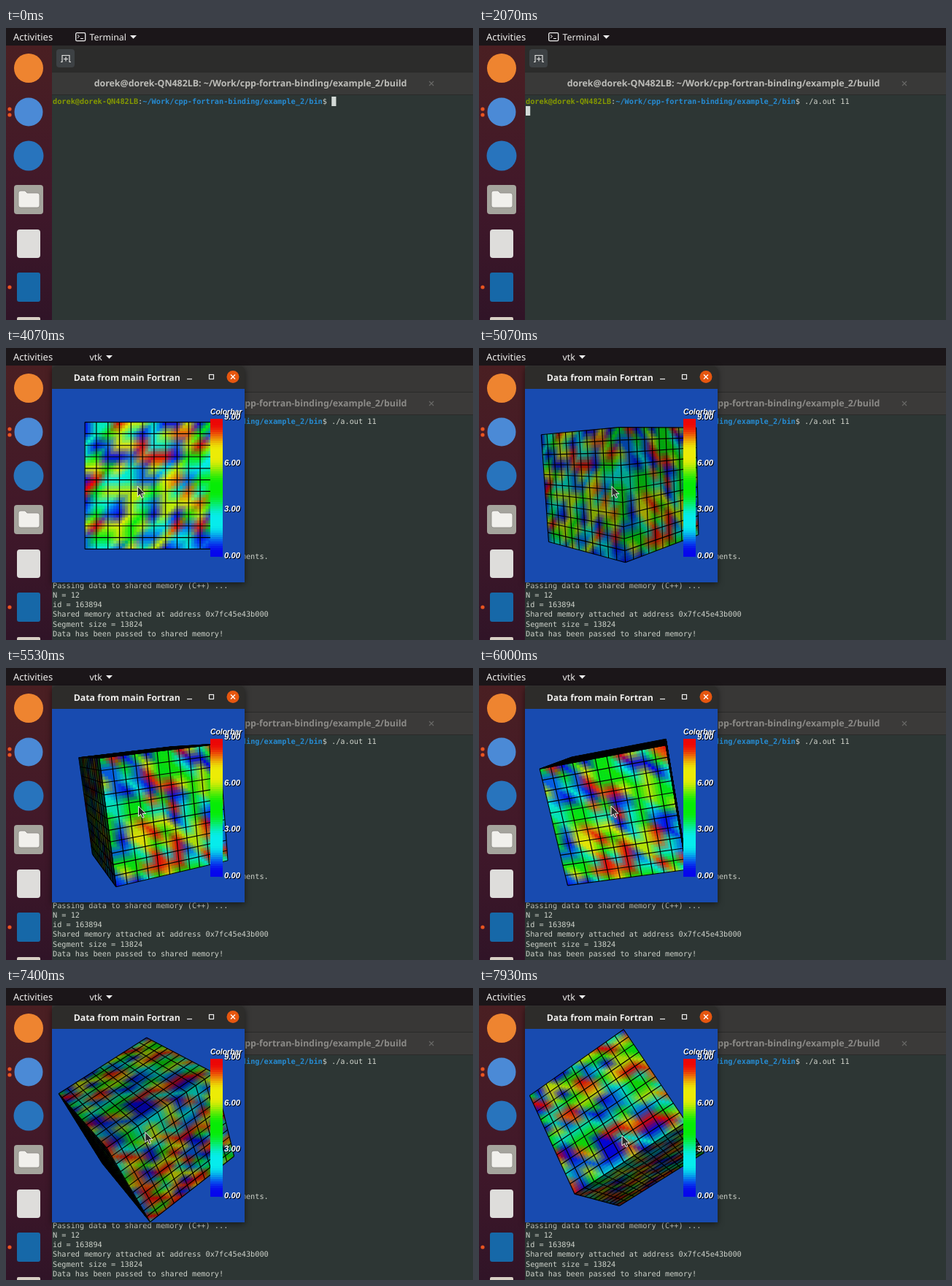
Recreate the animation shown at these times as an HTML page with a canvas. Size 640 by 400 pixels, loop 8000 ms.

```html
<!DOCTYPE html>
<html lang="en">
<head>
<meta charset="utf-8">
<title>Terminal and volume viewer</title>
<style>
html, body { margin: 0; width: 100%; height: 100%; overflow: hidden; background: #2d3634; }
#stage { position: relative; width: 640px; height: 400px; overflow: hidden; }
#stage > svg { position: absolute; left: 0; top: 0; }
text { text-rendering: geometricPrecision; white-space: pre; }
.ui { font-family: "Noto Sans", "Open Sans", sans-serif; fill: #f0efed; }
.mono { font: 10.24px "DejaVu Sans Mono", monospace; fill: #cfd3cb; }
.user { font-weight: bold; fill: #859900; }
.path { font-weight: bold; fill: #268bd2; }
.tab { font-size: 12.4px; font-weight: bold; text-anchor: middle; fill: #bcbcb8; }
#header { fill: #2c2c2b; }
#tabs { fill: #393938; }
.blurred #header { fill: #383736; }
.blurred #tabs { fill: #3b3a39; }
.blurred .tab { fill: #8b8a87; }
#win { position: absolute; left: 63px; top: 25px; width: 264px; height: 296px;
  border-radius: 6px 6px 0 0; background: #2d2c2a; box-shadow: 0 2px 9px rgba(0,0,0,.55); }
#win > *, #labels > * { position: absolute; }
#view { left: 0; top: 31px; }
#labels span { color: #fff; font: italic bold 11.3px/12px "Liberation Sans", sans-serif;
  text-shadow: 1px 1px 0 #000; white-space: nowrap; left: 236px; }
#labels .caption { left: 217px; top: 56.5px; font-size: 10.4px; }
</style>
</head>
<body>
<div id="stage">
  <svg id="desk" width="640" height="400">
    <defs>
      <linearGradient id="dock" x2="0" y2="1">
        <stop offset="0" stop-color="#4a1f22"/><stop offset=".55" stop-color="#41182a"/><stop offset="1" stop-color="#301427"/>
      </linearGradient>
    </defs>
    <rect width="640" height="400" fill="#2d3634"/>
    <rect id="header" x="63" y="24" width="577" height="36"/>
    <rect id="tabs" x="63" y="60" width="577" height="32"/>
    <path d="M63 60.5H640M63 91.5H640" stroke="#2a2a29"/>
    <rect x="69" y="29" width="25" height="25" rx="4" fill="#3d4144"/>
    <path d="M75 46.5h2V37.5h10V46.5h2M82 39.5v6M79 42.5h6" fill="none" stroke="#e2e2e0" stroke-width="1.2"/>
    <text class="ui tab" x="335" y="80">dorek@dorek-QN482LB: ~/Work/cpp-fortran-binding/example_2/build</text>
    <path d="M580 73l6 6m0-6l-6 6" stroke="#676765" stroke-width="1.2"/>

    <g class="mono">
      <text x="64" y="103.8"><tspan class="user">dorek@dorek-QN482LB</tspan>:<tspan class="path">~/Work/cpp-fortran-binding/example_2/bin</tspan>$ <tspan id="command"></tspan></text>
      <g id="output"></g>
    </g>
    <rect id="caret" width="6.2" height="13" fill="#d3d9d6"/>

    <rect y="24" width="63" height="376" fill="url(#dock)"/>
    <circle cx="31" cy="55" r="20" fill="#ee8430"/>
    <circle cx="31" cy="115" r="19.5" fill="#4b8ad6"/>
    <circle cx="31" cy="175" r="20.5" fill="#2874bd"/>
    <rect x="11" y="215" width="40" height="40" rx="4" fill="#a5a49d"/>
    <path d="M17 226q0-3 3-3h6l3 3h14q3 0 3 3v14q0 3-3 3h-23q-3 0-3-3z" fill="#f1f0ec" stroke="#8b8a84" stroke-width=".8"/>
    <rect x="15" y="276" width="32" height="39" rx="4" fill="#dedddb"/>
    <rect x="15" y="335" width="32" height="40" rx="3" fill="#1668a8"/>
    <rect x="15" y="396" width="32" height="8" rx="2" fill="#d8cfc4"/>
    <g fill="#e95420">
      <circle cx="5" cy="111" r="2.6"/><circle cx="5" cy="119" r="2.6"/><circle cx="5" cy="355" r="2.6"/>
    </g>

    <rect width="640" height="24" fill="#1b1619"/>
    <text class="ui" x="10" y="16.5" font-size="13">Activities</text>
    <g id="appTerminal">
      <rect x="95.7" y="6.7" width="13" height="11" rx="1.5" fill="none" stroke="#eee" stroke-width="1.3"/>
      <path d="M98 9.5l2.5 2-2.5 2M102 14.5h4" fill="none" stroke="#eee"/>
      <text class="ui" x="114.5" y="16.5" font-size="12.3">Terminal</text>
      <path d="M170 10h9l-4.5 4.8z" fill="#eee"/>
    </g>
    <g id="appViewer">
      <text class="ui" x="114.5" y="16.5" font-size="12.3">vtk</text>
      <path d="M137 10h9l-4.5 4.8z" fill="#eee"/>
    </g>
  </svg>

  <div id="win">
    <svg width="264" height="31">
      <text class="ui" x="29.7" y="19.5" font-size="12.3" font-weight="bold">Data from main Fortran</text>
      <path d="M185 17.5h7" stroke="#eee" stroke-width="1.2"/>
      <rect x="215.5" y="11.5" width="6" height="6" fill="none" stroke="#eee" stroke-width="1.2"/>
      <circle cx="248" cy="14.5" r="8.5" fill="#e6560f"/>
      <path d="M245 11.5l6 6m0-6l-6 6" stroke="#fff" stroke-width="1.3"/>
    </svg>
    <canvas id="view" width="264" height="265"></canvas>
    <div id="labels"><span class="caption">Colorbar</span></div>
  </div>

  <svg id="mouse" width="640" height="400">
    <path d="M0 0V14l3.2-3 2.3 5 2.2-1-2.200-4.800h4.500z" fill="#2a2a2a" stroke="#fff" stroke-width=".9"/>
  </svg>
</div>

<script>
const $ = id => document.getElementById(id);
const LOOP = 8000, TICK = 1000 / 15;
const CHAR = 6.165, ROW = 13.23;
const CELLS = 11, SUB = 4, FINE = CELLS * SUB;
const DISTANCE = 3.346, FOCAL = 494.5, CX = 132, CY = 132.5;
const OPEN = 34, RENDER = 47;

const typing = [[0, ''], [1, '.'], [4, './'], [6, './a'], [13, './a.'],
  [15, './a.out '], [23, './a.out 1'], [25, './a.out 11']];

// Output lines: row, tick of appearance, text
const output = [
  [14, OPEN, 'Allocated shared array of 12 x 12 x 12 elements.'],
  [17, RENDER, 'Passing data to shared memory (C++) ...'],
  [18, RENDER, 'N = 12'],
  [19, RENDER, 'id = 163894'],
  [20, RENDER, 'Shared memory attached at address 0x7fc45e43b000'],
  [21, RENDER, 'Segment size = 13824'],
  [22, RENDER, 'Data has been passed to shared memory!']
];

// Tick, then orientation quaternion (w, x, y, z)
const spin = [
  [61, 1, 0, 0, 0],
  [62, .9998, .0027, -.0173, 0],
  [64, .9998, .0027, -.0173, 0],
  [76, .9239, .0601, -.3781, 0],
  [90, .648, .138, -.748, -.012],
  [102, .309, .184, -.933, -.029],
  [119, .1, .277, -.797, -.528]
];
const pointer = [[RENDER, 232, 276], [58, 180, 189.5], [76, 182, 189.5],
  [90, 181, 189], [102, 185, 192.5], [119, 196, 202]];

function track(keys, t) {
  let i = 0;
  while (i < keys.length - 2 && t >= keys[i + 1][0]) i++;
  const [a, b] = [keys[i], keys[i + 1]];
  const k = clamp((t - a[0]) / (b[0] - a[0]));
  return a.slice(1).map((v, n) => v + (b[n + 1] - v) * k);
}

const clamp = v => Math.min(1, Math.max(0, v));
const curve = c => 6 + 115 * (1 - Math.cos(Math.PI * clamp(c * 1.2 - .1)));
const rgb = c => `rgb(${c.map(Math.round)})`;

// Blue to red rainbow with an S-curve on every channel
function rainbow(v) {
  const h = (1 - v) * 4;
  return [2 - h, Math.min(h, 4 - h), h - 2].map(curve);
}

function vertexColor(x, y, z) {
  const s = Math.sin(x * 12.9898 + y * 78.233 + z * 37.719 + 4) * 43758.5453;
  return rainbow(Math.floor((s - Math.floor(s)) * 10) / 9);
}

function axes(q) {
  const n = Math.hypot(...q);
  const [w, x, y, z] = q.map(v => v / n);
  return [
    [1 - 2 * (y * y + z * z), 2 * (x * y + w * z), 2 * (x * z - w * y)],
    [2 * (x * y - w * z), 1 - 2 * (x * x + z * z), 2 * (y * z + w * x)],
    [2 * (x * z + w * y), 2 * (y * z - w * x), 1 - 2 * (x * x + y * y)]
  ];
}

function project(basis, p) {
  const [x, y, z] = [0, 1, 2].map(r => p[0] * basis[0][r] + p[1] * basis[1][r] + p[2] * basis[2][r]);
  const scale = FOCAL / (DISTANCE - z);
  return [CX + x * scale, CY - y * scale];
}

const ctx = $('view').getContext('2d');

function trace(...points) {
  ctx.beginPath();
  points.forEach(p => ctx.lineTo(p[0], p[1]));
}

function drawFace(basis, axis, side) {
  const facing = basis[axis][2] * side;
  if (facing * DISTANCE <= .5) return;
  const u = (axis + 1) % 3, v = (axis + 2) % 3;
  const place = (a, b, c) => { const p = []; p[axis] = a; p[u] = b; p[v] = c; return p; };
  const color = (i, j) => vertexColor(...place(side > 0 ? CELLS : 0, i, j));
  const grid = [];
  for (let i = 0; i <= FINE; i++) {
    grid.push([]);
    for (let j = 0; j <= FINE; j++)
      grid[i].push(project(basis, place(side / 2, i / FINE - .5, j / FINE - .5)));
  }

  // Each cell is two triangles with blended corner colours
  ctx.lineWidth = .7;
  for (let i = 0; i < CELLS; i++) for (let j = 0; j < CELLS; j++) {
    const c00 = color(i, j), c10 = color(i + 1, j), c01 = color(i, j + 1), c11 = color(i + 1, j + 1);
    for (let m = 0; m < SUB; m++) for (let n = 0; n < SUB; n++) {
      const a = (m + .5) / SUB, b = (n + .5) / SUB;
      const mid = a > b ? c10 : c01, hi = Math.max(a, b), lo = Math.min(a, b);
      const X = i * SUB + m, Y = j * SUB + n;
      ctx.fillStyle = ctx.strokeStyle = rgb(c00.map((c, k) =>
        facing * (c * (1 - hi) + mid[k] * (hi - lo) + c11[k] * lo)));
      trace(grid[X][Y], grid[X + 1][Y], grid[X + 1][Y + 1], grid[X][Y + 1]);
      ctx.closePath();
      ctx.fill();
      ctx.stroke();
    }
  }

  ctx.strokeStyle = '#000';
  ctx.lineWidth = 1.15;
  for (let i = 0; i <= FINE; i += SUB) {
    trace(grid[i][0], grid[i][FINE]);
    ctx.stroke();
    trace(grid[0][i], grid[FINE][i]);
    ctx.stroke();
  }
}

function drawView(tick) {
  ctx.fillStyle = tick < RENDER ? '#000' : '#184bb0';
  ctx.fillRect(0, 0, 264, 265);
  if (tick < RENDER) return;
  const basis = axes(track(spin, tick));
  for (let axis = 0; axis < 3; axis++) [-1, 1].forEach(side => drawFace(basis, axis, side));
  const bands = 63;
  for (let i = 0; i < bands; i++) {
    ctx.fillStyle = rgb(rainbow(1 - i / (bands - 1)));
    ctx.fillRect(217, 41 + i * 3, 17, 3);
  }
}

const lines = output.map(([row, , text]) => {
  const line = document.createElementNS('http://www.w3.org/2000/svg', 'text');
  line.setAttribute('x', 64);
  line.setAttribute('y', 103.8 + row * ROW);
  line.textContent = text;
  return $('output').appendChild(line);
});

['9.00', '6.00', '3.00', '0.00'].forEach((text, i) => {
  const label = document.createElement('span');
  label.textContent = text;
  label.style.top = `${62.5 + i * 63.4}px`;
  $('labels').append(label);
});

const show = (el, on) => { el.style.display = on ? '' : 'none'; };

function draw(tick) {
  const command = typing.filter(k => k[0] <= tick).pop()[1];
  const entered = tick >= 31, open = tick >= OPEN;
  $('command').textContent = command;
  $('caret').setAttribute('x', entered ? 64 : 64 + CHAR * (62 + command.length));
  $('caret').setAttribute('y', entered ? 107 : 94);
  show($('caret'), tick < RENDER);
  lines.forEach((line, i) => show(line, tick >= output[i][1]));

  $('desk').classList.toggle('blurred', open);
  show($('appTerminal'), !open);
  show($('appViewer'), open);
  const grow = clamp((tick - OPEN + 1) / 4);
  show($('win'), open);
  $('win').style.opacity = grow;
  $('win').style.transform = `scale(${.9 + .1 * grow})`;
  show($('labels'), tick >= RENDER);
  if (open) drawView(tick);

  show($('mouse'), tick >= RENDER);
  $('mouse').firstElementChild.setAttribute('transform', `translate(${track(pointer, tick)})`);
}

let last = -1;
function frame() {
  const tick = Math.min(119, Math.floor((performance.now() % LOOP + 5) / TICK));
  if (tick !== last) draw(last = tick);
  requestAnimationFrame(frame);
}
frame();
</script>
</body>
</html>
```
